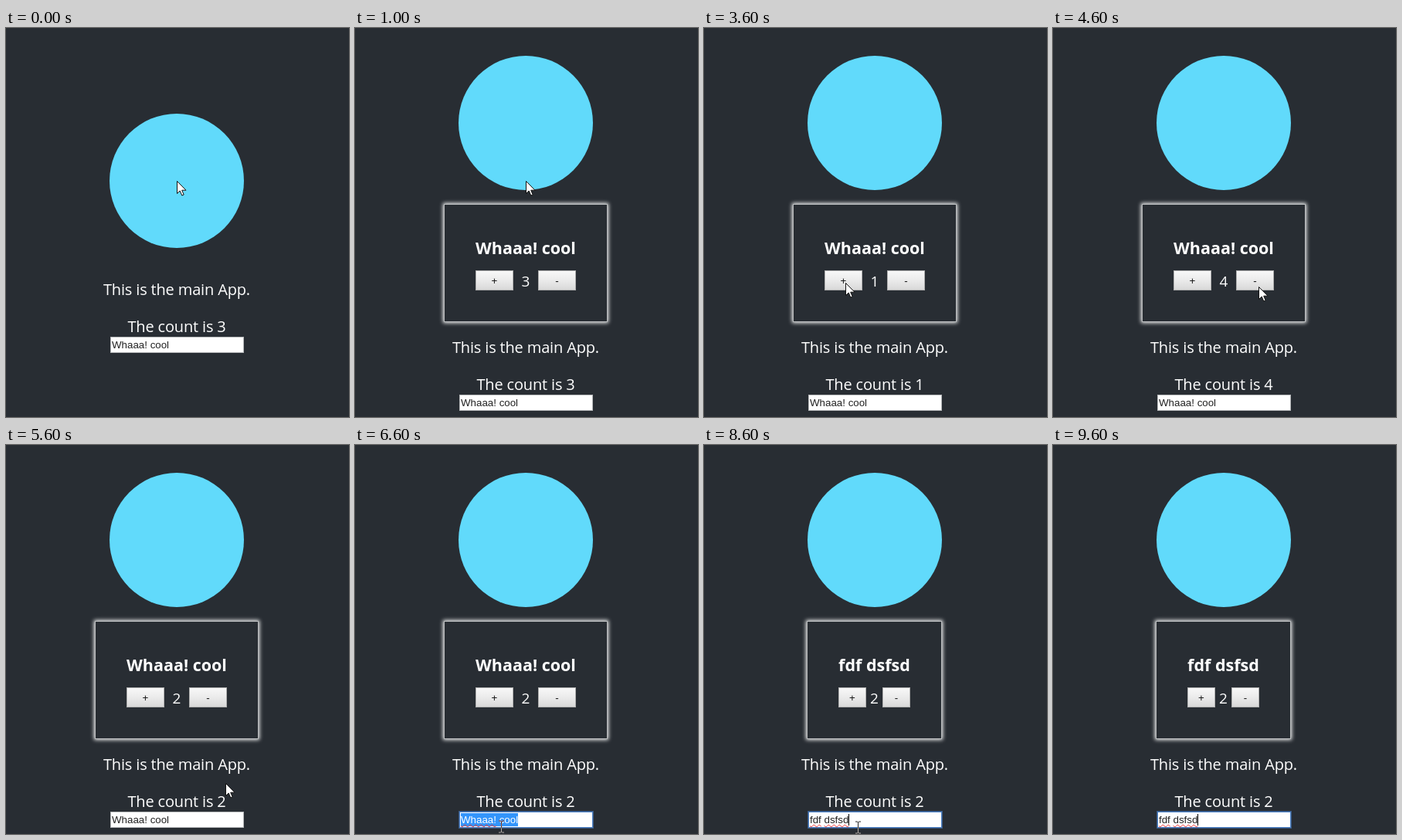
An HTML page for the animation above (9800 ms loop, 444 by 504 pixels).

```html
<!DOCTYPE html>
<html lang="en">
<head>
<meta charset="utf-8">
<title>Counter app</title>
<style>
  html, body { margin: 0; width: 100%; height: 100%; overflow: hidden; background: #282d33; }
  #stage { position: relative; width: 444px; height: 504px; overflow: hidden; color: #fff;
    background: #282d33; font: 20px/24px "Open Sans", "Noto Sans", sans-serif; }
  #stage > *, #modal > *, #below > * { position: absolute; box-sizing: border-box; white-space: pre; }
  #logo { left: 134px; top: 111px; width: 174px; height: 174px; border-radius: 50%; background: #61dafb; }
  #below { left: 0; top: 0; width: 442px; }
  .line { left: 0; width: 442px; text-align: center; letter-spacing: -.16px; }
  #field { left: 135px; top: 400px; width: 173px; height: 21px; padding: 1px 0 0 1px; background: #fff;
    border: 1px solid #b4b6b8; color: #222; font: 13.33px/17px "Liberation Sans", Arial, sans-serif; }
  #field.focus { border-color: #4a7fc4; box-shadow: 0 0 0 1px #4a7fc488; }
  #field .sel { display: inline-block; height: 17px; background: #3395fb; color: #fff; }
  #field .typo { text-decoration: underline wavy #e33 1px; text-underline-offset: 1px; }
  #field .caret { display: inline-block; width: 1px; height: 15px; background: #000; vertical-align: -3px; }
  #modal { top: 228px; height: 153px; border: 1px solid #b9bbbd; background: #282d33;
    box-shadow: 0 0 5px 1px #fff; }
  #title { top: 44px; font-weight: 700; font-size: 21.5px; }
  .btn { top: 85px; height: 26px; border: 1px solid #b0b0b0; color: #111; text-align: center;
    background: linear-gradient(#f8f8f8, #e9e9e9 55%, #d9d9d9);
    font: 13.33px/26px "Liberation Sans", Arial, sans-serif; }
  #num { top: 87px; font-size: 19px; text-align: center; }
  #arrow, #beam { left: 0; top: 0; overflow: visible; }
  #beam { mix-blend-mode: difference; }
</style>
</head>
<body>
<div id="stage">
  <div id="logo"></div>
  <div id="below">
    <div class="line" style="top:327px">This is the main App.</div>
    <div class="line" id="count" style="top:375px"></div>
    <div id="field"></div>
  </div>
  <div id="modal">
    <div id="title"></div>
    <div class="btn" id="plus">+</div>
    <div id="num"></div>
    <div class="btn" id="minus">-</div>
  </div>
  <svg id="arrow" width="13" height="20">
    <path d="M.5 .5V16.5L4.2 13L6.8 19L9.2 18L6.7 12.2H12Z" fill="#fff" stroke="#111"/>
  </svg>
  <svg id="beam" width="8" height="16">
    <path d="M-3.5 -7.5H-1L0 -6.5L1 -7.5H3.5M0 -6.5V6.5M-3.5 7.5H-1L0 6.5L1 7.5H3.5" fill="none" stroke="#ddd"/>
  </svg>
</div>
<script>
const $ = id => document.getElementById(id);
const LOOP = 9800, TICK = 200, OPEN = 1000, SELECT = 6400, TYPE = 7000, CENTER = 221, SHIFT = 75;

const counts = [[0, 3], [1800, 2], [2400, 1], [3800, 2], [4000, 3], [4200, 4], [4800, 3], [5000, 2]];
const typed = [[0, 'Whaaa! cool'], [TYPE, 'f'], [7400, 'fd'], [7600, 'fdf'],
  [8000, 'fdf d'], [8200, 'fdf dsf'], [8400, 'fdf dsfsd']];
const path = [[0, 221, 198], [1000, 221, 198], [1800, 259, 331], [2400, 259, 331], [3200, 183, 330],
  [4200, 183, 330], [4600, 266, 335], [5000, 266, 335], [5400, 300, 420], [6000, 240, 488],
  [6400, 189, 494], [6800, 189, 494], [7400, 199, 495], [8600, 199, 495], [9200, 460, 470], [LOOP, 460, 470]];

const valueAt = (steps, t) => steps.filter(s => s[0] <= t).pop()[1];

function pointAt(t) {
  const i = path.findIndex(p => p[0] > t);
  const [t0, x0, y0] = path[i - 1], [t1, x1, y1] = path[i];
  const u = (t - t0) / (t1 - t0), e = u * u * (3 - 2 * u);
  return [x0 + (x1 - x0) * e, y0 + (y1 - y0) * e];
}

function place(el, left, width) {
  el.style.left = left + 'px';
  el.style.width = width + 'px';
}

const moveTo = (el, x, y) => el.style.transform = `translate(${x}px, ${y}px)`;

function drawField(text, t) {
  const focus = t >= SELECT;
  const selected = focus && t < TYPE;
  const typing = focus && !selected;
  const words = text.split(' ');
  const marked = words.map((w, i) => {
    const done = i < words.length - 1 || (typing && t >= 8600);
    return focus && done ? `<span class="typo">${w}</span>` : w;
  }).join(' ');
  $('field').className = focus ? 'focus' : '';
  $('field').innerHTML = selected ? `<span class="sel">${marked}</span>`
    : marked + (typing ? '<span class="caret"></span>' : '');
}

function drawModal(text, n) {
  $('title').textContent = text;
  $('num').textContent = n;
  const tw = $('title').getBoundingClientRect().width;
  const w = Math.max(54, Math.ceil(tw - .2));
  const left = Math.round(23 + (w - 54) * .345);
  const right = Math.min(left, Math.round(20 + (w - 54) * .42));
  place($('modal'), Math.floor(CENTER - w / 2 - 41), w + 82);
  $('title').style.left = 40 + (w - tw) / 2 + 'px';
  place($('plus'), 40, left);
  place($('num'), 40 + left, w - left - right);
  place($('minus'), 40 + w - right, right);
}

function draw(t) {
  const open = t >= OPEN, text = valueAt(typed, t), n = valueAt(counts, t);
  // opening the modal pushes the logo up and the rest down
  moveTo($('logo'), 0, open ? -SHIFT : 0);
  moveTo($('below'), 0, open ? SHIFT : 0);
  $('count').textContent = 'The count is ' + n;
  $('modal').style.visibility = open ? 'visible' : 'hidden';
  drawField(text, t);
  drawModal(text, n);

  const [x, y] = pointAt(t).map(Math.round);
  const inField = open && x > 135 && x < 308 && y > 475 && y < 497;
  $('beam').style.display = inField ? '' : 'none';
  $('arrow').style.display = inField ? 'none' : '';
  moveTo($('beam'), x + .5, y + .5);
  moveTo($('arrow'), x, y);
}

let last = -1;
const start = performance.now();
function frame() {
  const t = Math.floor((performance.now() - start) % LOOP / TICK) * TICK;
  if (t !== last) draw(last = t);
  requestAnimationFrame(frame);
}
frame();
</script>
</body>
</html>
```
